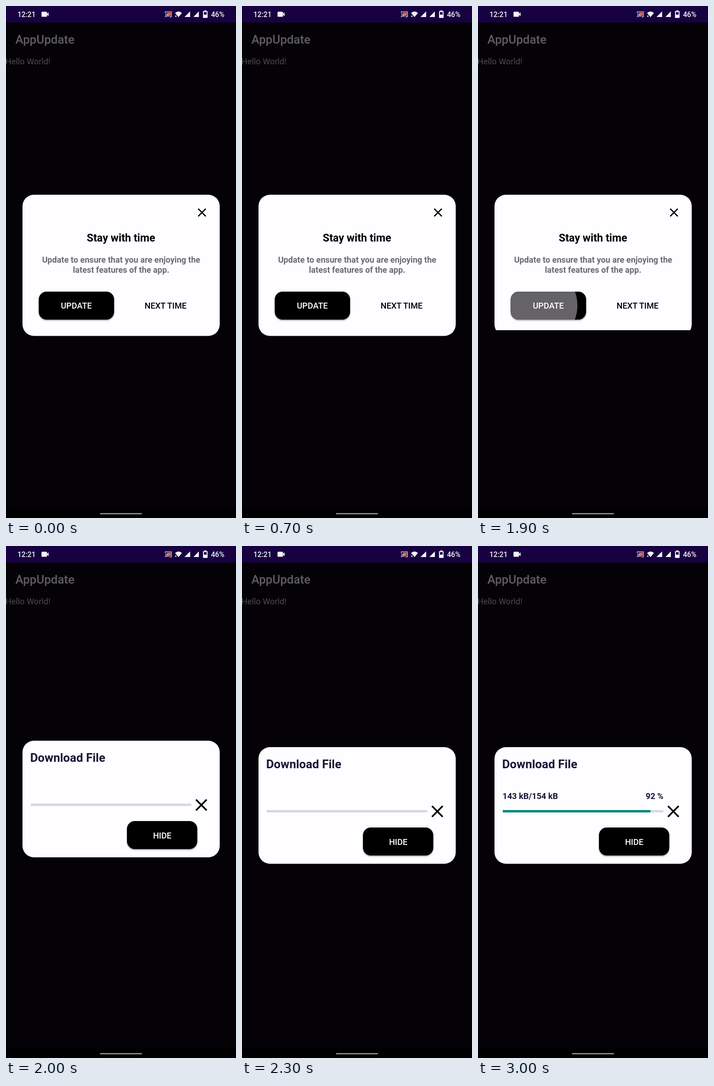
Animation, 502 px wide and 1115 px high, one loop 3.1 s. Source, as an HTML page:

```html
<!DOCTYPE html>
<html lang="en">
<head>
<meta charset="utf-8">
<title>App update dialog</title>
<style>
  html, body { margin: 0; width: 100%; height: 100%; overflow: hidden; background: #040206; }
  svg { display: block; width: 502px; height: 1115px; font-family: Roboto, sans-serif; }
  text { white-space: pre; }
  .status { font-size: 15.6px; font-weight: 500; fill: #f4f2f6; }
  .icon { fill: #f4f2f6; }
  .card { fill: #fefdff; }
  .bold { font-weight: 700; }
  .mid { text-anchor: middle; }
  .label { font-size: 18.2px; font-weight: 500; text-anchor: middle; }
  .small { font-size: 18.2px; }
  .navy { fill: #1a1635; }
  .cross { fill: none; stroke: #000; }
  .raised { filter: drop-shadow(0 2px 1.5px rgba(0, 0, 0, .35)); }
</style>
</head>
<body>
<svg viewBox="0 0 502 1115">
  <defs>
    <clipPath id="tear"><rect id="tearBox" width="502" height="1115"/></clipPath>
    <clipPath id="buttonShape"><rect x="71.5" y="622" width="164.5" height="61" rx="17"/></clipPath>
  </defs>

  <rect width="502" height="1115" fill="#040206"/>
  <rect width="502" height="36" fill="#170141"/>
  <rect y="1094" width="502" height="21" fill="#000"/>
  <rect x="205" y="1104.3" width="92" height="2.8" rx="1.4" fill="#8d8c8e"/>

  <!-- status bar -->
  <text class="status" x="25" y="24">12:21</text>
  <text class="status" x="447.5" y="24">46%</text>
  <g class="icon">
    <rect x="77.5" y="12.5" width="12" height="11" rx="1.5"/>
    <path d="M89 17.5 L93 13.8 V22.2 L89 18.5Z"/>
    <path d="M369 15.2 Q376.5 8.8 384 15.2 L376.5 24.3Z"/>
    <path d="M389.5 24 L402 11.7 V24Z M409 24 L421 11.7 V24Z"/>
    <path d="M433 9.5 H437.3 V11.3 H439 Q440 11.3 440 12.3 V25 Q440 26 439 26 H431 Q430 26 430 25 V12.3 Q430 11.3 431 11.3 H433Z"/>
  </g>
  <rect x="432" y="13.3" width="6" height="5.5" fill="#170141"/>
  <path d="M368 20 L371 18.5 L374 23.5 L371 25Z" fill="#170141"/>
  <circle cx="370.6" cy="22.3" r="1.5" class="icon"/>
  <rect x="351.5" y="14.5" width="8" height="7" fill="#e5684c"/>
  <path d="M347.6 15.5 V12.6 H361 V23.6 H356.5 M347.6 17.3 A6.4 6.4 0 0 1 354 23.7 M347.6 20.2 A3.5 3.5 0 0 1 351.1 23.7"
        fill="none" stroke="#e9e2ea" stroke-width="1.3"/>
  <circle cx="348" cy="23.2" r="1.1" class="icon"/>

  <!-- dimmed activity -->
  <text x="20.5" y="81.7" font-size="26" font-weight="500" fill="#5f5d60">AppUpdate</text>
  <text x="-1.2" y="127" font-size="18.2" fill="#4c4a4d">Hello World!</text>

  <g id="updateDialog" clip-path="url(#tear)">
    <rect class="card" x="36" y="411" width="430.5" height="307.5" rx="25"/>
    <path class="cross" d="M419.5 441.5 L436 458 M436 441.5 L419.5 458" stroke-width="2.7"/>
    <text class="bold mid" x="251" y="513" font-size="23.4">Stay with time</text>
    <g class="bold mid small" fill="#6d6b6e">
      <text x="251.3" y="559.3">Update to ensure that you are enjoying the</text>
      <text x="251.3" y="580.8">latest features of the app.</text>
    </g>
    <rect class="raised" x="71.5" y="622" width="164.5" height="61" rx="17"/>
    <circle id="ripple" cx="130" cy="652" r="87" fill="#656367" clip-path="url(#buttonShape)"/>
    <text class="label" x="153.5" y="659.3" fill="#fff">UPDATE</text>
    <text class="label" x="348.3" y="659.3">NEXT TIME</text>
  </g>

  <g id="downloadDialog">
    <rect class="card" x="36" y="438" width="430.5" height="254" rx="25"/>
    <text class="bold navy" x="52.7" y="484" font-size="26">Download File</text>
    <g id="counters" class="bold navy small">
      <text id="bytes" x="53.5" y="551.2"></text>
      <text id="percent" x="404.8" y="551.2" text-anchor="end"></text>
    </g>
    <rect x="54" y="575" width="350.5" height="5.2" fill="#d9d7da"/>
    <rect id="bar" x="54" y="575" width="0" height="5.2" fill="#088679"/>
    <path class="cross" d="M414.7 566.3 L438 589.7 M438 566.3 L414.7 589.7" stroke-width="3.7"/>
    <rect class="raised" x="264" y="613" width="153.5" height="61" rx="17"/>
    <text class="label" x="341" y="650.5" fill="#fff">HIDE</text>
  </g>
</svg>
<script>
  const LOOP = 3100, STEP = 100;
  const PRESS = 1900, OPEN = 2000, SETTLE = 2100, DOWNLOAD = 2500;
  const TOTAL_KB = 154, LOADED_KB = 143, CHUNKS = 6;
  const el = id => document.getElementById(id);
  const show = (id, on) => el(id).setAttribute('display', on ? 'inline' : 'none');

  function render(t) {
    const pressed = t >= PRESS;
    show('updateDialog', t < OPEN);
    show('ripple', pressed);
    el('tearBox').setAttribute('height', pressed ? 706 : 1115);

    show('downloadDialog', t >= OPEN);
    el('downloadDialog').setAttribute('transform', `translate(0 ${t < SETTLE ? -14 : 0})`);

    const chunk = Math.max(0, Math.min(CHUNKS, Math.floor((t - DOWNLOAD) / STEP) + 1));
    const kb = Math.round(LOADED_KB * chunk / CHUNKS);
    const percent = Math.floor(100 * kb / TOTAL_KB);
    show('counters', chunk > 0);
    el('bytes').textContent = `${kb} kB/${TOTAL_KB} kB`;
    el('percent').textContent = `${percent} %`;
    el('bar').setAttribute('width', 350.5 * percent / 100);
  }

  let start;
  function tick(now) {
    start ??= now;
    render((now - start) % LOOP);
    requestAnimationFrame(tick);
  }
  render(0);
  requestAnimationFrame(tick);
</script>
</body>
</html>
```
